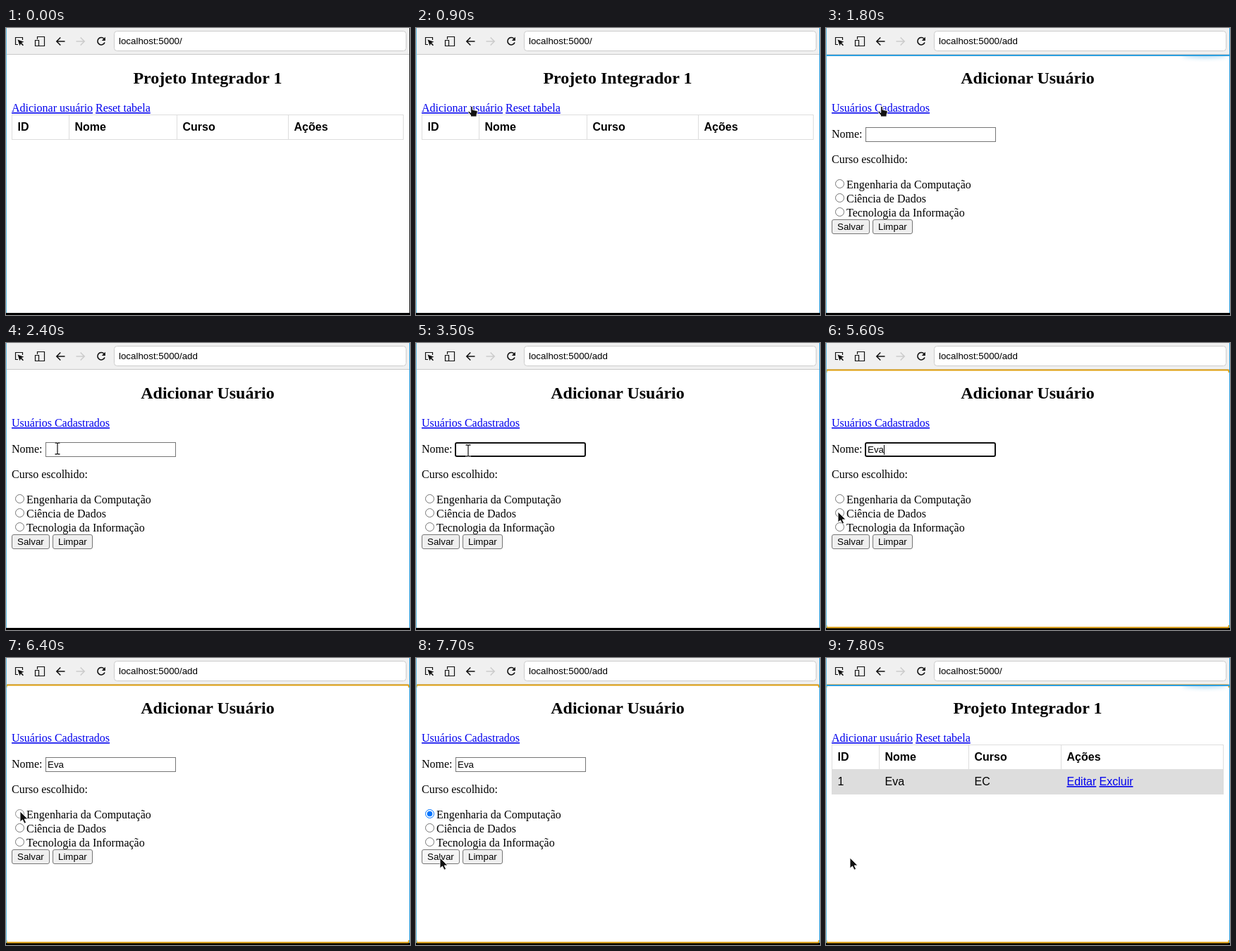
Animation of 573 by 408 pixels, one loop 8000 ms. Source, as an HTML page:

```html
<!DOCTYPE html>
<html lang="pt-BR">
<head>
<meta charset="utf-8">
<title>Cadastro</title>
<style>
html, body { margin: 0; width: 100%; height: 100%; overflow: hidden; background: #fff; }
svg { display: block; width: 573px; height: 408px; }
text { font: 16px "Liberation Serif", serif; fill: #000; white-space: pre; }
.sans { font-family: "Liberation Sans", sans-serif; }
.ui { font: 13.333px "Liberation Sans", sans-serif; }
.bold { font-weight: bold; }
.title { font-size: 24px; font-weight: bold; text-anchor: middle; }
.link { fill: #00e; text-decoration: underline; }
.line { fill: none; stroke: #ddd; shape-rendering: crispEdges; }
.icon { fill: none; stroke: #111; stroke-width: 1.5; }
</style>
</head>
<body>
<svg viewBox="0 0 573 408">
  <defs>
    <filter id="blur" x="-50%" y="-300%" width="200%" height="700%"><feGaussianBlur stdDeviation="3"/></filter>
    <clipPath id="view"><rect y="38" width="573" height="367"/></clipPath>
  </defs>
  <rect width="573" height="408" fill="#fff"/>

  <g id="home"></g>
  <g id="add"></g>

  <rect width="573" height="37" fill="#f0f0f0"/>
  <rect y="37" width="573" height="1" fill="#c9c9c9"/>
  <g class="icon">
    <path d="M17 23.5H13.5V13.5H23.5V17" stroke-width="1.2"/>
    <path d="M16.5 16.5L25.5 19.8 22 21 25 24.2 23.8 25.2 20.9 22.2 19.5 25.3Z" fill="#111" stroke="none"/>
    <path d="M44.5 16V12.5H54.5V25.5H47M41.5 17.5H46.5V25.5H41.5Z" stroke-width="1.2"/>
    <path id="arrow" d="M83.5 19H72M77.3 13.5L71.8 19 77.3 24.5"/>
    <use href="#arrow" transform="translate(183 0) scale(-1 1)" opacity=".16"/>
    <path d="M139 15.3A5.2 5.2 0 1 0 140 20.5" stroke-width="1.6"/>
    <path d="M140.9 12.8V17.9H135.8Z" fill="#111" stroke="none"/>
  </g>
  <rect x="153.5" y="4.5" width="414" height="28" rx="4" fill="#fff" stroke="#ccc"/>
  <text id="url" class="ui" x="160" y="23"></text>

  <rect y="405" width="573" height="3" fill="#000"/>
  <g id="ring" fill="none" stroke="#e0a010" stroke-width="2">
    <path d="M.5 42V40.5Q.5 38.5 2.5 38.5H569.5Q571.5 38.5 571.5 40.5V42"/>
    <path d="M.5 401V402.5Q.5 404.5 2.5 404.5H569.5Q571.5 404.5 571.5 402.5V401"/>
  </g>
  <rect width="1" height="405" fill="#62bfe4"/>
  <rect id="edge" x="572" width="1" height="405"/>
  <g id="bar" clip-path="url(#view)">
    <ellipse cx="537" cy="39" rx="32" ry="3" fill="#29d" opacity=".4" filter="url(#blur)"/>
    <rect x="1" y="38" width="571" height="2" fill="#2b9fe0"/>
  </g>

  <g id="cursor">
    <path id="pointer" d="M0 0V15L3.5 12 6 17.3 8.6 16.1 6.2 11H11Z" fill="#111" stroke="#fff" stroke-width=".9"/>
    <path id="hand" d="M-1.3 1Q0-.8 1.3 1V5.2L7.3 6.6Q8.4 7 8.2 9L7 12V15H-1.5V13L-5 8.8Q-5.4 6.9-3.6 7.4L-1.3 9.4Z" fill="#111" stroke="#fff" stroke-width=".9"/>
    <g id="beam" fill="none">
      <path d="M-3.5-8H-1L0-7 1-8H3.5M0-7V7M-3.5 8H-1L0 7 1 8H3.5" stroke="#fff" stroke-width="3"/>
      <path d="M-3.5-8H-1L0-7 1-8H3.5M0-7V7M-3.5 8H-1L0 7 1 8H3.5" stroke="#222" stroke-width="1.3"/>
    </g>
  </g>
</svg>
<script>
const LOOP = 8000, STEP = 100, NAME = 'Eva';
const $ = id => document.getElementById(id);
const text = (x, y, s, cls = '', id = '') => `<text x="${x}" y="${y}" class="${cls}" id="${id}">${s}</text>`;
const show = (id, on) => $(id).setAttribute('visibility', on ? 'visible' : 'hidden');
const set = (id, attrs) => { for (const k in attrs) $(id).setAttribute(k, attrs[k]); };

function table(cols, row) {
  const bottom = row ? 193.5 : 158.5;
  const x = cols.map(c => c + 8.5);
  let s = row ? '<rect x="8" y="158" width="556" height="36" fill="#ddd"/>' : '';
  s += `<path class="line" d="M8.5 123.5H563.5V${bottom}H8.5ZM8.5 158.5H563.5` +
    cols.slice(1).map(c => `M${c + .5} 123.5V158.5`).join('') + '"/>';
  ['ID', 'Nome', 'Curso', 'Ações'].forEach((h, i) => s += text(x[i], 146, h, 'sans bold'));
  if (row) {
    row.forEach((v, i) => s += text(x[i], 181, v, 'sans'));
    s += text(x[3], 181, 'Editar', 'sans link') + text(x[3] + 46, 181, 'Excluir', 'sans link');
  }
  return s;
}

const button = (x, w, label, id) =>
  `<rect id="${id}" x="${x + .5}" y="272.5" width="${w - 1}" height="20" rx="2.5" fill="#efefef" stroke="#767676"/>` +
  text(x + 8, 287, label, 'ui');

const radio = (label, i) =>
  `<circle id="radio${i}" cx="19.5" cy="${221.5 + 20 * i}" r="6" fill="#fff" stroke="#767676"/>` +
  text(29, 228 + 20 * i, label);

$('home').innerHTML = text(286, 79, 'Projeto Integrador 1', 'title') +
  text(8, 119, 'Adicionar usuário', 'link', 'addLink') + text(127, 119, 'Reset tabela', 'link') +
  `<g id="empty">${table([8, 89, 242, 400])}</g>` +
  `<g id="filled">${table([8, 75, 202, 333], [1, NAME, 'EC'])}</g>`;

$('add').innerHTML = text(286, 79, 'Adicionar Usuário', 'title') +
  text(8, 119, 'Usuários Cadastrados', 'link') + text(8, 156, 'Nome:') +
  '<rect id="field" fill="#fff"/>' + text(59, 156, '', 'ui', 'value') +
  '<rect id="caret" y="145" width="1" height="14"/>' +
  text(8, 192, 'Curso escolhido:') +
  ['Engenharia da Computação', 'Ciência de Dados', 'Tecnologia da Informação'].map(radio).join('') +
  '<circle id="dot" cx="19.5" cy="221.5" r="3.8"/>' +
  button(8, 54, 'Salvar', 'save') + button(66, 57, 'Limpar', 'clear');

// time, x, y of the mouse
const path = [
  [100, 558, 262], [200, 430, 225], [300, 280, 178], [400, 165, 143], [500, 102, 121], [600, 82, 111],
  [800, 82, 111], [900, 79, 111], [2100, 79, 111], [2200, 78, 119], [2300, 75, 138], [2400, 73, 150],
  [2500, 73, 150], [2600, 74, 153], [5100, 74, 153], [5200, 70, 162], [5300, 58, 182], [5400, 42, 206],
  [5500, 27, 228], [5600, 17, 240], [5700, 14, 241], [5900, 15, 230], [6200, 20, 218],
  [6600, 20, 218], [6900, 27, 246], [7200, 34, 284], [LOOP, 34, 284]
];

function mouse(t) {
  const i = Math.max(1, path.findIndex(p => p[0] >= t));
  const [a, b] = [path[i - 1], path[i]];
  const k = Math.max(0, (t - a[0]) / (b[0] - a[0]));
  return [a[1] + (b[1] - a[1]) * k, a[2] + (b[2] - a[2]) * k];
}

const between = (t, a, b) => t >= a && t < b;

function draw(now) {
  const t = Math.floor(now % LOOP / STEP) * STEP;
  const onAdd = between(t, 1800, 7800), saved = t >= 7800;

  $('home').style.display = onAdd ? 'none' : '';
  $('add').style.display = onAdd ? '' : 'none';
  show('empty', !saved);
  show('filled', saved);
  $('addLink').style.fill = t === 1700 ? '#e00' : '';
  $('url').textContent = 'localhost:5000/' + (onAdd ? 'add' : '');

  const loading = between(t, 1800, 2200) || saved ? 1 : t === 2200 ? .5 : 0;
  set('bar', { opacity: loading });
  set('edge', { fill: t < 100 ? '#222' : '#2b9fe0' });
  show('ring', t >= 4000);

  const focus = between(t, 3000, 6400);
  set('field', focus
    ? { x: 56, y: 142, width: 184, height: 19, rx: 2, stroke: '#101010', 'stroke-width': 2 }
    : { x: 56.5, y: 141.5, width: 184, height: 20, rx: 0, stroke: '#767676', 'stroke-width': 1 });
  const typed = [4100, 4500, 4600].filter(k => t >= k).length;
  $('value').textContent = NAME.slice(0, typed);
  // caret blinking restarts with each key
  const since = t - (t >= 4600 ? 4600 : t >= 4000 ? 4000 : 3000);
  const lit = onAdd && focus && since % 1000 < 500;
  $('caret').style.display = lit ? '' : 'none';
  set('caret', { x: typed ? Math.round(59 + $('value').getComputedTextLength()) : 59 });

  const [x, y] = mouse(t);
  const checked = t >= 6500;
  const hover = Math.hypot(x - 19.5, y - 221.5) < 7;
  set('radio0', { stroke: checked ? (hover ? '#005cc8' : '#0075ff') : t === 6400 ? '#8d8d8d' : hover ? '#4f4f4f' : '#767676' });
  set('dot', { fill: hover ? '#005cc8' : '#0075ff' });
  $('dot').style.display = checked ? '' : 'none';
  const over = onAdd && between(x, 8, 62) && between(y, 272, 293);
  set('save', { fill: t === 7700 ? '#f5f5f5' : over ? '#e5e5e5' : '#efefef', stroke: over && t < 7700 ? '#4f4f4f' : '#767676' });

  const kind = between(t, 500, 2300) ? 'hand' : between(t, 2400, 5300) ? 'beam' : 'pointer';
  for (const k of ['pointer', 'hand', 'beam']) $(k).style.display = k === kind ? '' : 'none';
  set('cursor', { transform: `translate(${x} ${y})` });
  show('cursor', t >= 100);
}

const start = performance.now();
(function tick() {
  draw(performance.now() - start);
  requestAnimationFrame(tick);
})();
</script>
</body>
</html>
```
